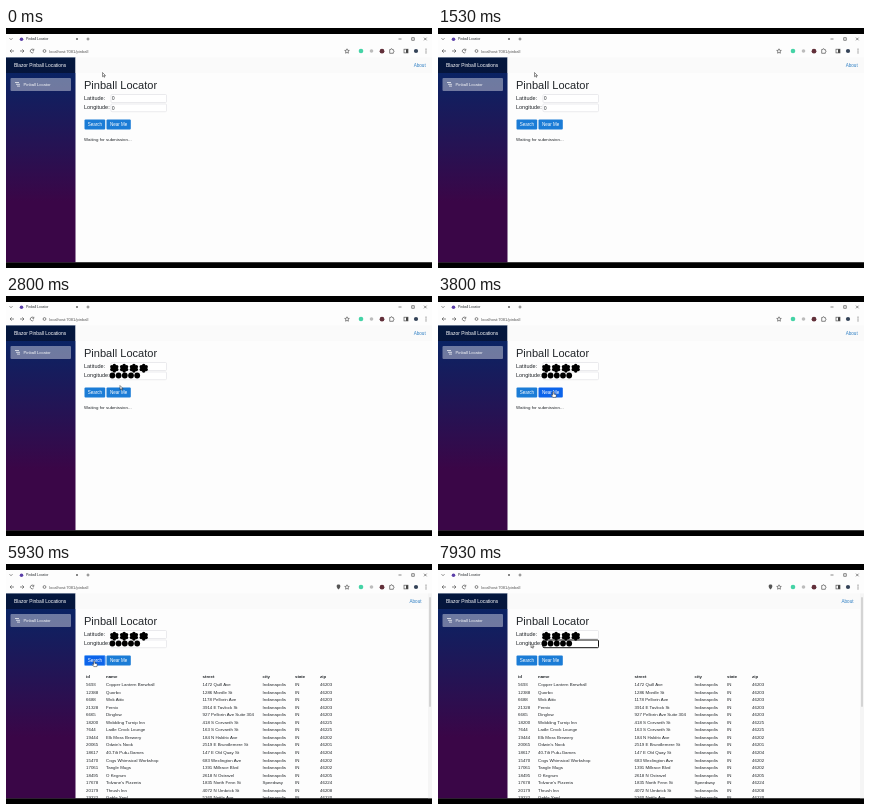
These frames come from a looping animation (426 by 240 pixels, 8000 ms). An HTML page:

```html
<!DOCTYPE html>
<html lang="en">
<head>
<meta charset="utf-8">
<title>Pinball Locator</title>
<style>
  html, body { margin: 0; width: 100%; height: 100%; overflow: hidden; background: #000; }
  svg { display: block; width: 100vw; height: 100vh; }
  text { font-family: "Liberation Sans", Arial, sans-serif; fill: #212529; white-space: pre; }
  .line { fill: none; stroke: #555; stroke-width: .7; }
  .field { fill: #fff; stroke: #dedee2; stroke-width: .6; }
  .field.focus { stroke: #101010; stroke-width: 1; }
  .button rect { fill: #1b7cd6; }
  .button.hover rect { fill: #0d64ea; }
  .button.focus rect { stroke: #69a9f7; stroke-width: 1; }
  .button text { fill: #fff; text-anchor: middle; }
  .light { fill: #fff; }
</style>
</head>
<body>
<svg viewBox="0 0 426 240" preserveAspectRatio="none">
  <defs>
    <linearGradient id="side" x1="0" y1="0" x2="0" y2="1">
      <stop offset="0" stop-color="#052767"/>
      <stop offset=".7" stop-color="#3a0647"/>
      <stop offset="1" stop-color="#3a0647"/>
    </linearGradient>
  </defs>
  <rect width="426" height="240"/>
  <rect y="6" width="426" height="228.5" fill="#fdfdfd"/>

  <!-- browser bar -->
  <path class="line" d="M3.5 10.2l1.5 1.5 1.5-1.5M70 10l2 2m0-2l-2 2M80.5 11h3m-1.5-1.5v3M392.5 11h3M405.7 9.7h2.6v2.6h-2.6zM418 9.7l2.6 2.6m0-2.6l-2.6 2.6"/>
  <circle cx="15.5" cy="11.2" r="1.8" fill="#5b3fa8"/>
  <text x="20" y="12.4" font-size="3.4">Pinball Locator</text>
  <path class="line" d="M8 23H4m1.7-1.7L4 23l1.7 1.7M14 23h4m-1.7-1.7L18 23l-1.7 1.7M27.6 22a1.8 1.8 0 1 0 .1 1.8M27.8 20.8v1.5h-1.5"/>
  <circle class="line" cx="38.5" cy="23" r="1.4"/>
  <text x="43" y="24.5" font-size="4.1" style="fill:#555">localhost:7081/pinball</text>
  <path id="pin" d="M332.5 25.6c-3-3-1.9-5 0-5s3 2 0 5z" fill="#555"/>
  <path class="line" d="M341 20.8l.7 1.5 1.6.2-1.2 1.1.3 1.6-1.4-.8-1.4.8.3-1.6-1.2-1.1 1.6-.2z"/>
  <circle cx="355" cy="23" r="2.3" fill="#45d3a6"/>
  <circle cx="365.5" cy="23" r="1.8" fill="#bcbcbc"/>
  <circle cx="376" cy="23.2" r="2.4" fill="#62303a"/>
  <path class="line" d="M383.7 21.5h1a.8.8 0 0 1 1.6 0h1v1a.8.8 0 0 1 0 1.6v1.2h-3.6z"/>
  <rect class="line" x="398" y="21.2" width="4" height="3.7"/>
  <rect x="400" y="21.2" width="2" height="3.7" fill="#444"/>
  <circle cx="410" cy="23" r="2.1" fill="#334257"/>
  <path d="M420 20.7v.9m0 1v.9m0 1v.9" stroke="#444" stroke-width=".9"/>

  <!-- page -->
  <rect y="29.5" width="69.5" height="205" fill="url(#side)"/>
  <rect y="29.5" width="69.5" height="15.5" fill="#000" opacity=".4"/>
  <text class="light" x="8" y="39.4" font-size="4.9">Blazor Pinball Locations</text>
  <rect x="4.5" y="50" width="60.5" height="13" rx="1" fill="#fff" opacity=".4"/>
  <path d="M9 54.5h4m-3 1.8h4m-3 1.8h3" stroke="#fff" stroke-width=".7"/>
  <text class="light" x="17.5" y="58" font-size="4.1">Pinball Locator</text>
  <rect x="69.5" y="29.5" width="356.5" height="15.5" fill="#fafafa"/>
  <text id="about" y="39.4" font-size="4.6" style="fill:#2f7fc4">About</text>
  <text x="78" y="61" font-size="11.05">Pinball Locator</text>
  <text x="78" y="71.6" font-size="5.5">Latitude:</text>
  <text x="78" y="81" font-size="5.5">Longitude:</text>
  <rect class="field" x="105" y="66.5" width="55.5" height="8" rx="1"/>
  <rect class="field" id="longitude" x="105" y="76" width="55.5" height="7.7" rx="1"/>
  <g id="zeros"><text x="106" y="72.4" font-size="4.6">0</text><text x="106" y="81.6" font-size="4.6">0</text></g>
  <g id="blobs"></g>
  <g class="button" id="search">
    <rect x="78.5" y="91.5" width="20.7" height="10" rx="1"/><text x="88.8" y="98.2" font-size="4.5">Search</text>
  </g>
  <g class="button" id="near">
    <rect x="100.5" y="91.5" width="24.3" height="10" rx="1"/><text x="112.6" y="98.2" font-size="4.5">Near Me</text>
  </g>
  <text id="waiting" x="78" y="113.4" font-size="4.4">Waiting for submission...</text>
  <g id="results" font-size="4.4">
    <rect x="422" y="29.5" width="4" height="205" fill="#f5f5f5"/>
    <rect x="423" y="33" width="2" height="110" rx="1" fill="#d4d4d4"/>
  </g>
  <rect y="234.5" width="426" height="5.5"/>

  <g id="cursor" fill="#fff" stroke="#222" stroke-width=".5">
    <path id="arrow" d="M0 0v4.2l1-.9.7 1.5.7-.3-.7-1.5h1.3z"/>
    <path id="hand" d="M-.6.3q.6-.8 1.2 0v2l2 .5q.5.2.4.8l-.4 2H-.5L-2 3.4q.2-.8 1.4.1z"/>
  </g>
</svg>
<script>
const LOOP = 8000;
const $ = id => document.getElementById(id);

function add(parent, tag, attrs, text = "") {
  const el = document.createElementNS("http://www.w3.org/2000/svg", tag);
  for (const key in attrs) el.setAttribute(key, attrs[key]);
  el.textContent = text;
  return parent.appendChild(el);
}

const dot = (cx, cy, r) => add($("blobs"), "circle", { cx, cy, r });
for (let i = 0; i < 4; i++) {
  const x = 108.3 + i * 9.8;
  dot(x, 72.2, 2.8);
  for (let k = 0; k < 6; k++) {
    const a = (k + .5) * Math.PI / 3;
    dot(x + 2.8 * Math.cos(a), 72.2 + 2.8 * Math.sin(a), 1.75);
  }
}
for (let i = 0; i < 5; i++) dot(106.4 + i * 6.2, 79.5, 2.9);

const columns = [80, 100, 196.5, 256.5, 289, 314];
const places = `5693|Copper Lantern Brewhall|1472 Quill Ave|46203
12388|Quorbo|1286 Mordle St|46203
6688|Wok Attic|1178 Pellorin Ave|46203
21328|Fernix|3914 E Tavlock St|46203
6665|Dinglow|927 Pellorin Ave Suite 304|46203
18200|Wobbling Turnip Inn|418 S Corvanth St|46225
7644|Ladle Crock Lounge|163 S Corvanth St|46225
19444|Elk Moss Brewery|184 N Haldric Ave|46202
20065|Odwin's Nook|2519 E Brundlemere St|46201
18617|40-Tilt Pub+Games|147 E Old Quay St|46204
15470|Cogs Whimsical Workshop|683 Wexlington Ave|46202
17061|Tangle Mugs|1391 Millrace Blvd|46202
18495|O Kegrum|2618 N Ostravel|46205
17678|Tolvane's Pizzeria|1835 North Fenn St|46224
20179|Thrush Inn|4072 N Umbrick St|46208
19222|Gable Yard|5260 Nettle Ave|46220`.split("\n");

function addRow(cells, y, weight = "normal") {
  cells.forEach((cell, i) => add($("results"), "text", { x: columns[i], y, "font-weight": weight }, cell));
}
addRow(["id", "name", "street", "city", "state", "zip"], 114, "bold");
places.forEach((line, i) => {
  const [id, name, street, zip] = line.split("|");
  const city = zip === "46224" ? "Speedway" : "Indianapolis";
  addRow([id, name, street, city, "IN", zip], 122.2 + i * 7.53);
});

// Pointer stops: time, x, y
const path = [
  [0, 96.5, 44.5], [2350, 96.5, 44.5], [2800, 114, 89.5], [3250, 115.3, 95.8],
  [4450, 115.3, 95.8], [4850, 88.3, 97], [7100, 88.3, 97], [7650, 93, 79.5], [LOOP, 93, 79.5]
];

function pointerAt(t) {
  const i = path.findIndex(stop => stop[0] > t);
  const [t0, x0, y0] = path[i - 1], [t1, x1, y1] = path[i];
  const p = (t - t0) / (t1 - t0), e = p * p * (3 - 2 * p);
  return [x0 + (x1 - x0) * e, y0 + (y1 - y0) * e];
}

const show = (id, on) => { $(id).style.display = on ? "" : "none"; };

function draw(now) {
  const t = now % LOOP;
  const [x, y] = pointerAt(t);
  const over = (left, right) => x > left && x < right && y > 91 && y < 102;
  const overSearch = over(78, 99.5), overNear = over(100, 125);
  const masked = t >= 2450, located = t >= 4250, loaded = t >= 5600;

  $("cursor").setAttribute("transform", `translate(${x} ${y})`);
  show("hand", overSearch || overNear);
  show("arrow", !overSearch && !overNear);
  show("zeros", !masked);
  show("blobs", masked);
  show("pin", located);
  show("waiting", !loaded);
  show("results", loaded);
  $("about").setAttribute("x", loaded ? 403.5 : 407.7);

  $("search").classList.toggle("hover", overSearch);
  $("near").classList.toggle("hover", overNear);
  $("near").classList.toggle("focus", located && t < 5300);
  $("search").classList.toggle("focus", t >= 5300 && t < 7650);
  $("longitude").classList.toggle("focus", t >= 7650);
  requestAnimationFrame(frame);
}

const start = performance.now();
function frame() { draw(performance.now() - start); }
frame();
</script>
</body>
</html>
```
